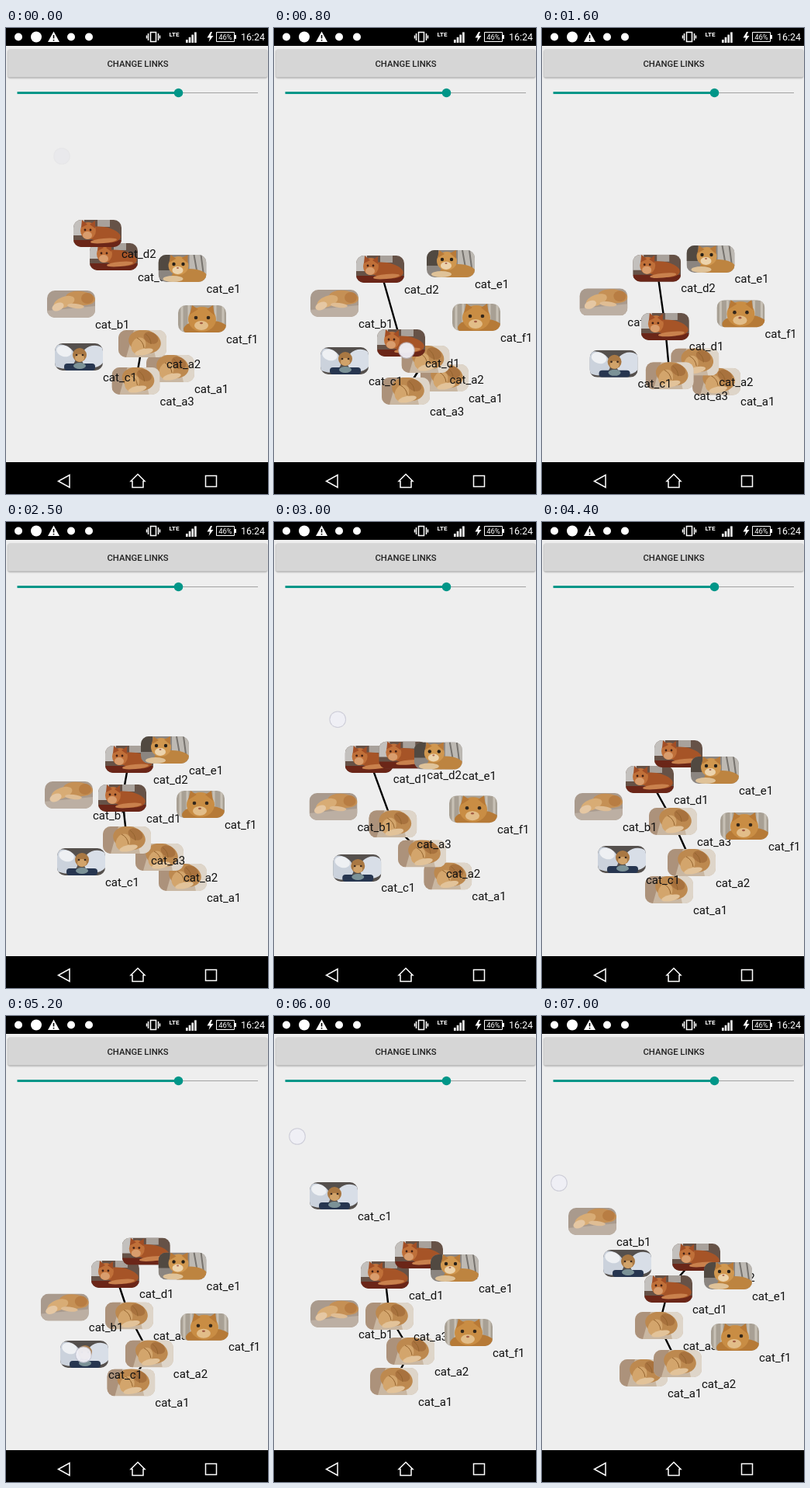
Recreate the animation shown at these times as an HTML page with a canvas. Size 338x600 px, loop 7.1 s.

```html
<!DOCTYPE html>
<html lang="en">
<head>
<meta charset="utf-8">
<title>Linked cats</title>
<style>
  html, body { margin: 0; width: 100%; height: 100%; overflow: hidden; background: #000; }
  canvas { display: block; }
</style>
</head>
<body>
<canvas id="stage" width="338" height="600"></canvas>
<script>
const ctx = document.getElementById('stage').getContext('2d');
const LOOP = 7100, STEP = 100, CARD_W = 62, CARD_H = 35;
const FONT = 'Roboto, sans-serif';

// Drawing helpers
function box(color, x, y, w, h, r = 0) {
  ctx.fillStyle = color;
  ctx.beginPath();
  ctx.roundRect(x, y, w, h, r);
  ctx.fill();
}
function oval(color, x, y, rx, ry = rx, turn = 0) {
  ctx.fillStyle = color;
  ctx.beginPath();
  ctx.ellipse(x, y, rx, ry, turn, 0, 7);
  ctx.fill();
}
function shape(color, points) {
  ctx.fillStyle = color;
  ctx.fill(new Path2D(`M${points}Z`));
}
function line(color, width, path) {
  ctx.strokeStyle = color;
  ctx.lineWidth = width;
  ctx.stroke(new Path2D(path));
}
function text(str, x, y, size, color = '#fff', weight = 400, align = 'left') {
  ctx.font = `${weight} ${size}px ${FONT}`;
  ctx.textAlign = align;
  ctx.fillStyle = color;
  ctx.fillText(str, x, y);
}

// Simplified photos, each drawn in a 62 x 35 card
const photos = {
  a() {
    box('#c9b7a2', 0, 0, 62, 35);
    shape('#ded5c9', '40 0L62 0 62 35 48 35');
    shape('#ac927b', '0 0L20 0 10 35 0 35');
    oval('#bd894f', 34, 15, 21, 15, 0.2);
    oval('#d3a56c', 26, 20, 9, 11, 0.5);
    oval('#a8723e', 42, 10, 10, 7, 0.5);
    oval('#e2c39a', 33, 28, 12, 4, -0.2);
    line('#94642f', 1, 'M24 10Q32 14 33 23M35 5Q42 10 42 18');
  },
  b() {
    box('#a99a8d', 0, 0, 62, 35);
    shape('#bcafa3', '0 26L62 20 62 35 0 35');
    oval('#c59055', 43, 10, 19, 9, 0.1);
    oval('#d8ac75', 22, 15, 14, 7, -0.35);
    oval('#e5c7a3', 14, 21, 8, 5, -0.4);
    oval('#b87d43', 52, 10, 8, 7);
    oval('#dfbd94', 37, 20, 11, 3, 0.1);
  },
  c() {
    box('#55504d', 0, 0, 62, 35);
    oval('#cbd2dc', 9, 17, 18, 15, 0.4);
    oval('#d8dee7', 50, 17, 16, 14, -0.4);
    oval('#eef0f3', 12, 10, 10, 7, 0.3);
    box('#273650', 12, 26, 40, 9, 4);
    oval('#a97843', 32, 15, 9, 9);
    oval('#d1a36a', 32, 19, 6, 5);
    oval('#39291f', 28, 15, 1.3);
    oval('#39291f', 36, 15, 1.3);
    oval('#7b9297', 32, 29, 8, 4);
  },
  d() {
    box('#665247', 0, 0, 62, 35);
    box('#c3c0bd', 0, 0, 14, 20);
    box('#a8a19b', 31, 0, 16, 9);
    box('#6b2618', 0, 26, 62, 9);
    oval('#a65427', 38, 19, 23, 10, 0.15);
    oval('#c07039', 19, 14, 10, 11);
    shape('#a24e25', '10 10L11 0 18 6');
    shape('#a24e25', '21 6L28 1 28 11');
    oval('#d99d6d', 18, 20, 6, 5);
    oval('#432015', 15, 13, 1.4);
    oval('#432015', 22, 13, 1.4);
    oval('#c9814d', 39, 27, 17, 3, -0.1);
  },
  e() {
    box('#8b8580', 0, 0, 62, 35);
    box('#514941', 0, 0, 15, 20);
    box('#bdb9b3', 40, 0, 22, 35);
    line('#77736e', 2, 'M46 0L51 28M55 0L59 30');
    oval('#bd8440', 40, 28, 23, 10);
    oval('#d0974f', 26, 14, 13, 12);
    shape('#b97a38', '14 10L16 0 23 5');
    shape('#b97a38', '30 4L38 0 38 11');
    oval('#ecd3ac', 25, 20, 7, 5);
    oval('#262018', 20, 12, 2.2);
    oval('#262018', 32, 12, 2.2);
    oval('#a86551', 25, 17, 1.5, 1);
    oval('#dfc298', 19, 31, 13, 4);
  },
  f() {
    box('#a8a094', 0, 0, 62, 35);
    line('#c7c0b5', 3, 'M5 0V35M14 0V35M48 0V35M58 0V35');
    oval('#b67a37', 36, 31, 29, 12);
    oval('#c98d44', 31, 18, 18, 16);
    shape('#b87936', '15 12L18 0 26 5');
    shape('#b87936', '37 5L45 0 47 13');
    oval('#e2bd89', 30, 26, 9, 6);
    oval('#33271b', 23, 16, 2.3);
    oval('#33271b', 39, 16, 2.3);
    oval('#a25b43', 30, 23, 2, 1.3);
  }
};

// Smooth path through [time, x, y] points without overshoot
function follow(points, t) {
  const last = points.length - 1;
  if (t <= points[0][0]) return points[0].slice(1);
  if (t >= points[last][0]) return points[last].slice(1);
  const i = points.findIndex(p => p[0] > t) - 1;
  const span = points[i + 1][0] - points[i][0];
  const u = (t - points[i][0]) / span;
  return [1, 2].map(axis => {
    const slope = k => (points[k + 1][axis] - points[k][axis]) / (points[k + 1][0] - points[k][0]);
    const tangent = k => {
      if (k === 0) return slope(0);
      if (k === last) return slope(last - 1);
      const before = slope(k - 1), after = slope(k);
      return before * after > 0 ? 2 * before * after / (before + after) : 0;
    };
    const from = points[i][axis], to = points[i + 1][axis];
    return from + (to - from) * u * u * (3 - 2 * u)
      + span * u * (1 - u) * ((1 - u) * tangent(i) - u * tangent(i + 1));
  });
}

const TIMES = [0, 800, 2500, 3500, 4400, 6000, 7000];
const node = (name, xs, ys, ...pulls) => ({
  name,
  path: TIMES.map((t, i) => [t, xs[i], ys[i]]).concat(pulls).sort((p, q) => p[0] - q[0])
});

// Back to front; the extra points are where a finger pulls the card
const nodes = [
  node('a1', [181, 189, 197, 188, 133, 124, 100], [421, 433, 440, 437, 456, 453, 442], [3700, 187, 438], [4200, 124, 474]),
  node('a2', [145, 164.5, 167, 153, 162, 145, 144], [389, 409, 414, 405, 421, 414, 430]),
  node('a3', [136.5, 139, 125, 121, 138, 118, 120], [437, 450, 392, 359, 368, 369, 381]),
  node('b1', [53, 47, 50, 41, 42, 47, 34], [338, 337, 334, 364, 349, 366, 247], [6450, 46, 366]),
  node('c1', [63, 60, 66, 85, 72, 46, 79], [406, 411, 420, 434, 417, 214, 301], [5200, 70, 418], [5600, 52, 338]),
  node('d1', [108, 133, 119, 97, 108, 112, 132], [277, 388, 338, 305, 314, 316, 334], [2700, 118, 337], [3200, 78, 262]),
  node('d2', [87, 106, 128, 141, 145, 156, 168], [247, 293, 288, 278, 281, 290, 293]),
  node('e1', [196.5, 197, 174, 189, 192, 202, 209], [292, 286, 276, 294, 302, 307, 317]),
  node('f1', [222, 230, 220, 232, 230, 220, 218], [357, 355, 346, 362, 374, 390, 396])
];

// Pairs of linked cards with the time each link appears
const links = [['a1', 'a2', 0], ['a2', 'a3', 0], ['d1', 'd2', 0], ['d1', 'a3', 900]];

const drags = [
  [[-300, 70, 175], [-120, 72, 165]],
  [[200, 139, 296], [800, 171, 415], [1000, 171, 425]],
  [[2700, 150, 355], [3200, 37, 187]],
  [[3700, 219, 455], [4200, 140, 536]],
  [[5200, 100, 436], [5600, 30, 285], [6000, 30, 155]],
  [[6500, 75, 380], [7000, 22, 215], [7100, 20, 205]]
];

function drawStatusBar() {
  box('#000', 0, 0, 338, 23);
  for (const x of [16, 39, 84, 107]) oval('#fff', x, 11.5, x === 39 ? 7 : 5);
  shape('#fff', '61.5 4.5L69 18 54 18');
  line('#000', 1.6, 'M61.5 9V13.5M61.5 15V16.5');
  line('#fff', 1.5, 'M186.5 5.5H193.5V17.5H186.5ZM183.5 7V16M196.5 7V16M181.5 9.5V13.5M198.5 9.5V13.5');
  text('LTE', 210.5, 11, 8, '#fff', 700);
  for (let i = 0; i < 4; i++) box('#fff', 232 + i * 3.7, 15 - i * 3.2, 2.6, 4 + i * 3.2);
  shape('#fff', '264 5L259.5 12.5 263 12.5 261.5 18 267.5 10 264 10 266 5');
  line('#fff', 1, 'M271.5 5.5H294.5V17.5H271.5Z');
  box('#fff', 295, 9, 2, 5);
  text('46%', 283, 15, 9.5, '#fff', 400, 'center');
  text('16:24', 303, 16, 12.4);
}

function drawControls() {
  box('#eee', 0, 23, 338, 536);
  ctx.save();
  ctx.shadowColor = 'rgba(0,0,0,.35)';
  ctx.shadowBlur = 2;
  ctx.shadowOffsetY = 1;
  box('#d6d6d6', 2.5, 27.5, 334.5, 36, 2);
  ctx.restore();
  text('CHANGE LINKS', 170, 50, 11.3, '#222', 500, 'center');
  box('#a2a2a2', 223, 83, 102, 1);
  box('#009688', 14.5, 82, 208, 3);
  oval('#009688', 222.5, 83.5, 5.8);
}

function drawNavBar() {
  box('#000', 0, 559, 338, 41);
  line('#fff', 1.5, 'M82 575.5V591.5L67.5 583.5ZM170 574.5L179 583.5H177V591.5H163V583.5H161ZM257.5 576.5H271.5V590.5H257.5Z');
}

function drawNode({ name }, [x, y]) {
  ctx.save();
  ctx.translate(x, y);
  ctx.beginPath();
  ctx.roundRect(0, 0, CARD_W, CARD_H, 10);
  ctx.clip();
  photos[name[0]]();
  ctx.restore();
  text('cat_' + name, x + CARD_W, y + 48.5, 15, '#111');
}

function drawTouch(drag, t) {
  const end = drag[drag.length - 1][0];
  const alpha = Math.min(1, 1 - (t - end) / 160);
  if (t < drag[0][0] || alpha <= 0) return;
  const [x, y] = follow(drag, t);
  ctx.save();
  ctx.globalAlpha = alpha;
  oval('rgba(190,190,205,.7)', x, y, 10.8);
  oval('rgba(245,245,250,.85)', x, y, 9.8);
  ctx.restore();
}

function draw(t) {
  drawControls();
  const at = {};
  for (const n of nodes) at[n.name] = follow(n.path, t);
  for (const [a, b, since] of links) {
    if (t < since) continue;
    const [p, q] = [at[a], at[b]].map(([x, y]) => `${x + CARD_W / 2} ${y + CARD_H / 2}`);
    line('#000', 2.4, `M${p}L${q}`);
  }
  for (const n of nodes) drawNode(n, at[n.name]);
  for (const drag of drags) drawTouch(drag, t);
  drawStatusBar();
  drawNavBar();
}

const start = performance.now();
function tick() {
  const t = (performance.now() - start) % LOOP;
  draw(Math.floor(t / STEP) * STEP);
  requestAnimationFrame(tick);
}
tick();
</script>
</body>
</html>
```
